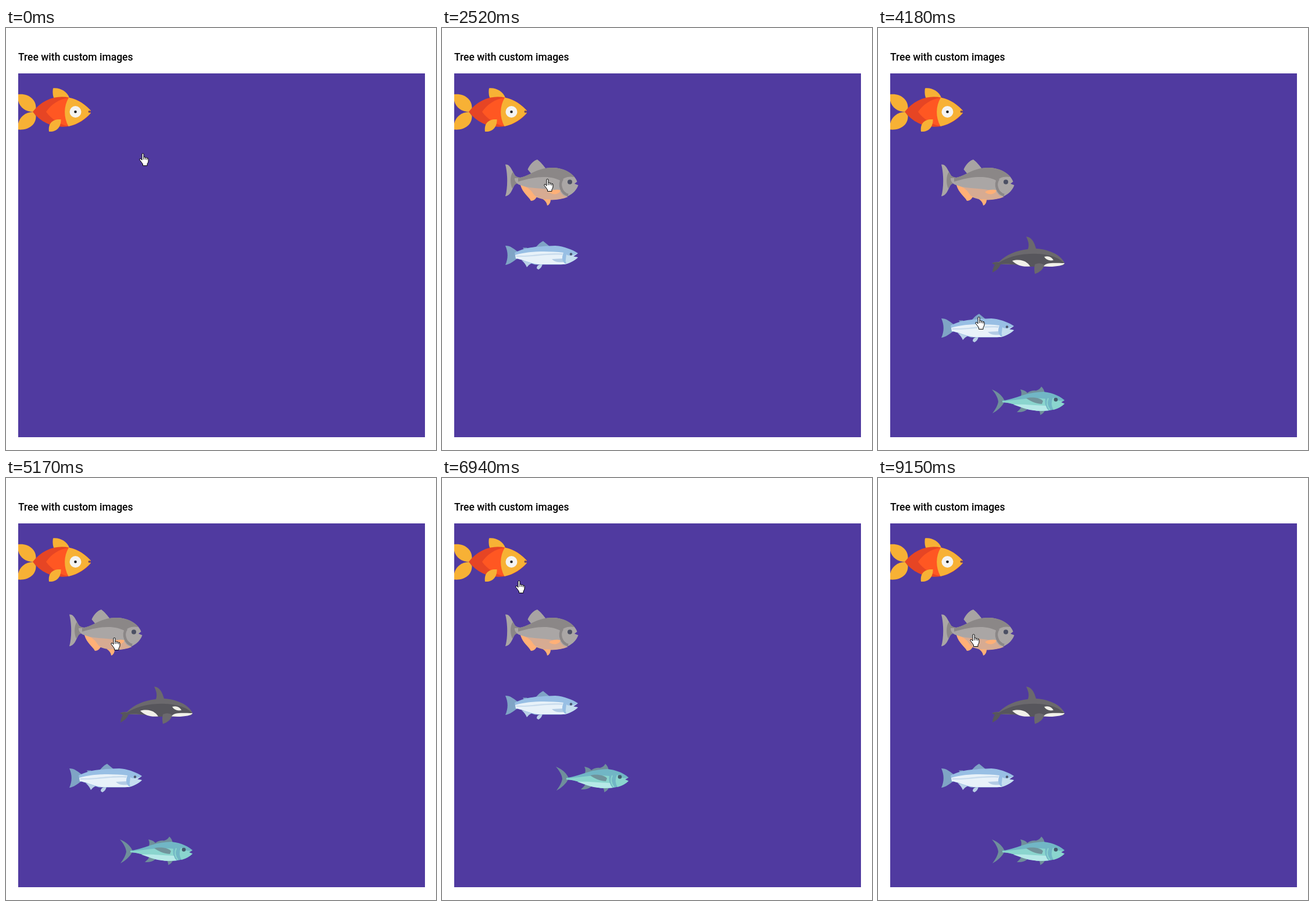
These frames come from a looping animation (740x725 px, 9780 ms). An HTML page:

```html
<!DOCTYPE html>
<html lang="en">
<head>
<meta charset="utf-8">
<title>Tree with custom images</title>
<style>
html, body { margin: 0; width: 100%; height: 100%; overflow: hidden; background: #fff; }
svg { display: block; }
text { font: 500 17.55px Roboto, sans-serif; }
.line { fill: none; }
</style>
</head>
<body>
<svg width="740" height="725" viewBox="0 0 740 725">
  <text x="21" y="56">Tree with custom images</text>
  <path fill="#503aa0" d="M21 78H721V703H21Z"/>

  <g id="goldfish">
    <g fill="#f7b135">
      <path d="M21 114C39 112 52 123 51.500 138L47 144C34 144 24 137 21 125Z"/>
      <path d="M21 174.500C39 176 52 166 51.500 151L47 144C33 145 24 152 21 164Z"/>
      <path d="M81 103.500C93 102 105 109 109 120L84 124C80 117 80 109 81 103.500Z"/>
    </g>
    <path fill="#e64524" d="M46 144C72 110 118 110 146 142L144 144L146 146C120 178 72 178 46 144Z"/>
    <path fill="#ff5722" d="M69 144C78 131 91 122 108 120L116 145L107 168.500C91 166 78 156 69 144Z"/>
    <path fill="#f7b135" d="M108 119.500C125 123 137 132 146 142L143 144L146 146C137 156 125 165 107.500 169C99 153 99 135 108 119.500Z"/>
    <path fill="#f7b135" d="M74 178C72 164 80 156 94.500 157C95 170 87 179 74 178Z"/>
    <circle cx="119.500" cy="144" r="10" fill="#f4f3f1"/>
    <circle cx="119.500" cy="144" r="2.300" fill="#222"/>
    <circle cx="143.500" cy="143.700" r="2" fill="#754657"/>
  </g>

  <g id="piranha">
    <path fill="#aaa6a5" d="M109 234.500C118 233 121 248 128 256L127 266C121 275 119 288 109 289C113.500 274 113 249 109 234.500Z"/>
    <path fill="#8b8787" d="M122 247C125 254 128 256 135 257L134 268C128 266 126 268 121 276C117 268 117 254 122 247Z"/>
    <path fill="#a8a4a3" d="M147.500 243C151 234 159 227 164 226C170 230 175 237 179 242L154 251Z"/>
    <path fill="#aaa6a5" d="M125 258C150 258 162 240 190 240C210 240 228 251 232.500 264L228 267.500L234.500 270C229 286 210 295 190 295C163 295 147 279 135 270C129 268 125 264 125 258Z"/>
    <path fill="#8b8787" d="M131 258C152 254 162 240 190 240C209 240 222 248 228 256C217 254 209 257 205 263C187 252 160 255 131 264Z"/>
    <path fill="#d7ab92" d="M135 270C152 277 177 274 204 281C206 286 211 290 217 290C195 299 166 297 149 283Z"/>
    <g fill="#ffb077">
      <path d="M135 270C139 284 149 289 153 297C158 297 161 294 163 290C154 286 158 276 135 270Z"/>
      <path d="M173.500 294Q180 298 181 305Q187 303 187 294.500Z"/>
      <path d="M184 282C190 277 200 277 204 279C201 286 192 288 184 282Z"/>
    </g>
    <path class="line" stroke="#8b8787" stroke-width="4.500" d="M207 259C200 270 206 284 217 287"/>
    <circle cx="220" cy="264.500" r="4" fill="#4c5063"/>
  </g>

  <g id="lower">
    <g id="salmon">
      <g fill="#7fa4c5">
        <path d="M109 374C118 374 123 379 130 384V396C122 401 117 406 109 407C114 396 114 385 109 374Z"/>
        <path d="M162 376Q169 368 174 366L185 375Z"/>
        <path d="M139 377.500H146L151 382H142Z"/>
      </g>
      <path fill="#b9d0e6" d="M137 399L156 403Q150 406 146 411Q143 404 137 399ZM163 413Q162 407 173 405Q172 412 166 415Z"/>
      <path fill="#98bfe4" d="M125 386C145 376 165 375 195 374C210 375 225 381 234 387L226 392.500L234 394C227 401 215 406 205 406.500H160C145 402 135 397 127 396Z"/>
      <path fill="#e8f2f9" d="M126 390C150 383 182 383 209 386C206 393 208 400 213 406H165C147 403 135 396 127 396Z"/>
      <path fill="#c9dced" d="M128 391C153 392 170 386 208 387L207 390C180 388 158 394 128 393Z"/>
      <path fill="#c5deef" d="M214 389C219 393 227 390 234 387L226 392.500L234 394C228 400 219 404 212 406Z"/>
      <path fill="#b3cce5" d="M189 397L208 396L210 402C201 403 194 402 189 397Z"/>
      <path class="line" stroke="#98bfe4" stroke-width="3" d="M213 386C207 391 207 399 213 404"/>
      <circle cx="222" cy="388.500" r="2.200" fill="#4c5770"/>
    </g>

    <g id="tuna"><g transform="translate(0 -125)">
      <path fill="#6f8f9b" d="M196 621C207 625 215 633 218 641C214 650 206 657 197 662C203 654 206 648 207 642C206 634 202 628 196 621ZM246 632Q248 626 245 621Q253 622 257 627Q264 622 272 623Q279 621 281 616Q286 620 287 628L254 636ZM249 648Q245 655 239 660Q252 661 259 653ZM276 656Q280 660 279 665Q286 662 288 655Z"/>
      <path fill="#71b6c5" d="M214 640C237 638 250 626 285 625C303 627 315 634 321 639.500L315 643L321 645.500C312 655 297 658 280 658C255 657 237 644 214 643Z"/>
      <path fill="#8ad5ce" d="M214 641C240 639 260 634 288 637Q286 648 293 657L280 658C255 657 237 644 214 643Z"/>
      <path fill="#b6e9e7" d="M233 647C250 646 266 648 289 649Q290 654 294 657C264 660 250 653 233 647Z"/>
      <path fill="#8ad5ce" d="M301 635Q311 643 321 639.500L315 643L321 645.500Q313 653 302 656Q296 646 301 635Z"/>
      <path fill="#70939b" d="M255 636C266 633 281 636 284 641L282 646C270 645 262 641 255 636Z"/>
      <path class="line" stroke="#8ad5ce" stroke-width="2" d="M293 636Q288 647 296 656"/>
      <circle cx="306" cy="638.500" r="3.300" fill="#435b6c"/>
    </g></g>
  </g>

  <g id="orca">
    <path fill="#6b696d" d="M196 404Q203 401 208 402C222 388 240 382 258 380C261 372 258 364 255 358.500C264 359 269 368 272 379C291 380 314 388 321 404L318 408L212 406Z"/>
    <path fill="#57565c" d="M196 404Q203 401 208 403C230 390 253 387 275 388C300 389 315 397 321 405C305 411 280 410 262 410C240 408 225 403 211 406Q208 415 197 420Q197 413 201 407Z"/>
    <path fill="#6b696d" d="M270 406Q279 402 286 407Q284 418 270 422.500Q268 414 270 406Z"/>
    <path fill="#f1f0e9" d="M231 400C245 396 257 401 262 409.500C250 411 239 408 231 400ZM286 393Q297 390 302 399Q291 401 286 393ZM285 409.500C289 402 304 404 321 404C320 409 300 411 285 409.500Z"/>
  </g>

  <g id="cursor" stroke="#000">
    <path fill="#fff" d="M5 2A1.500 1.500 0 0 1 8 2V7Q10 6 11 7.700Q13 7 13.700 8.500Q16 8 16 10V14Q16 16 14 18.500V21.500H6.500V19Q4 15 1 11.500Q.5 9 3 9.500L5 12Z"/>
    <path class="line" d="M8 7V11M11 8V11M13.700 9V11.500"/>
  </g>
</svg>
<script>
const LOOP = 9780;
// start, end, steps, then from, bend and to points
const moves = [
  [750, 1350, 9, 229, 215, 170, 190, 110, 148],
  [1920, 2520, 9, 110, 148, 135, 205, 175, 259],
  [3090, 4020, 13, 175, 259, 193, 380, 167, 496],
  [4390, 5170, 11, 167, 496, 236, 385, 180, 274],
  [6560, 7180, 9, 180, 274, 172, 203, 87, 145],
  [8590, 9070, 7, 87, 145, 118, 210, 158, 268]
];
const el = id => document.getElementById(id);
const show = (id, on) => el(id).style.display = on ? '' : 'none';
const shift = (id, x, y) => el(id).setAttribute('transform', `translate(${x} ${y})`);

function pointer(t) {
  const [start, end, steps, x0, y0, cx, cy, x1, y1] = moves.filter(m => m[0] <= t).pop() || moves[0];
  const step = Math.floor((t - start) / (end - start) * (steps - 1) + 0.15);
  const u = t < start ? 0 : Math.min(1, (step + 1) / steps);
  const p = u * u * (3 - 2 * u), q = 1 - p;
  const bend = (a, c, b) => Math.round(q * q * a + 2 * p * q * c + p * p * b);
  return [bend(x0, cx, x1), bend(y0, cy, y1)];
}

function draw(now) {
  const t = now % LOOP;
  const rootOpen = t >= 1520 && t < 7350 || t >= 8360;
  const orcaOpen = t >= 2840 && t < 5790 || t >= 9150;
  show('piranha', rootOpen);
  show('lower', rootOpen);
  show('orca', orcaOpen);
  show('tuna', t >= 4180);
  shift('lower', 0, orcaOpen ? 125 : 0);
  shift('cursor', ...pointer(t));
}

const begin = performance.now();
function tick() {
  draw(performance.now() - begin);
  requestAnimationFrame(tick);
}
tick();
</script>
</body>
</html>
```
